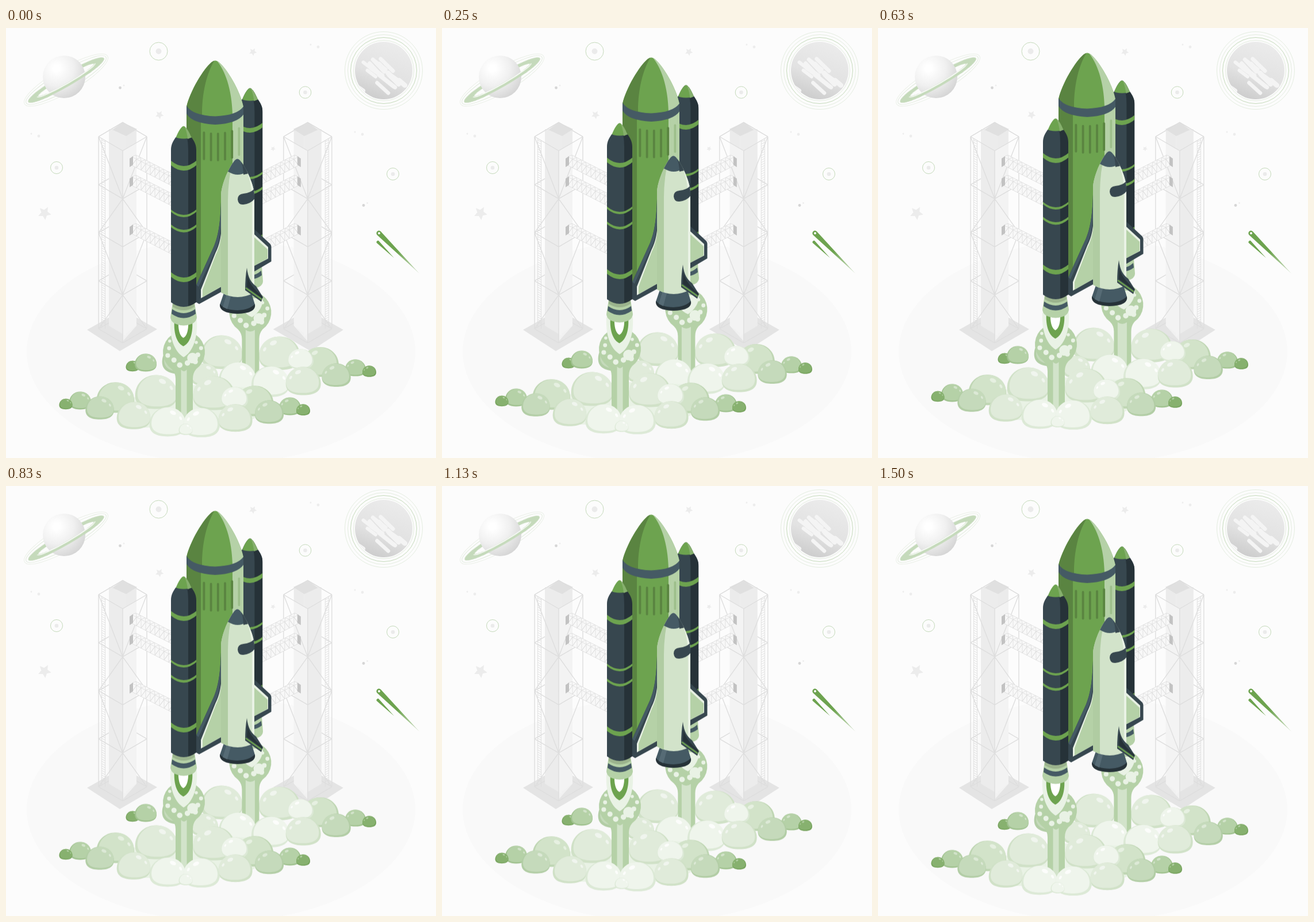
An HTML page that plays this animation: 748 by 748 pixels, repeating every 1540 ms.

```html
<!DOCTYPE html>
<html lang="en">
<head>
<meta charset="utf-8">
<title>Rocket launch</title>
<style>
html, body { margin: 0; width: 100%; height: 100%; overflow: hidden; background: #fcfcfc; }
svg { display: block; width: 748px; height: 748px; }
#ship { animation: hover 1540ms infinite; }
@keyframes hover {
  0% { transform: translateY(.1px); animation-timing-function: steps(17); }
  45.946% { transform: translateY(-15px); animation-timing-function: steps(19); }
  97.297% { transform: translateY(.7px); animation-timing-function: steps(1); }
  100% { transform: translateY(.1px); }
}
.ring { transform-origin: 104.5px 90.5px; animation: sway 1540ms linear infinite; }
@keyframes sway { 0%, 45%, 100% { transform: none; } 73% { transform: scale(.985); } }
.line { fill: none; stroke: #dedede; stroke-width: 1.4; stroke-linejoin: round; }
.thin { fill: none; stroke: #dcdcdc; stroke-width: .8; }
.green { fill: #6da34f; } .leaf { fill: #5a8441; } .pale { fill: #b5d1a7; }
.mist { fill: #d2e3ca; } .foam { fill: #e9f2e5; }
.slate { fill: #455a64; } .steel { fill: #37474f; } .night { fill: #263238; }
</style>
</head>
<body>
<svg viewBox="0 0 748 748">
  <defs>
    <radialGradient id="ball" cx=".32" cy=".3" r=".75">
      <stop offset=".1" stop-color="#fff"/><stop offset=".55" stop-color="#f0f0f0"/><stop offset="1" stop-color="#d6d6d6"/>
    </radialGradient>
    <linearGradient id="moon" x1=".75" y1="0" x2=".4" y2="1">
      <stop offset="0" stop-color="#ececec"/><stop offset=".6" stop-color="#e2e2e2"/><stop offset="1" stop-color="#cdcdcd"/>
    </linearGradient>
    <linearGradient id="tail" gradientUnits="userSpaceOnUse" x1="650" y1="358" x2="719" y2="427">
      <stop offset=".45" stop-color="#6da34f"/><stop offset="1" stop-color="#6da34f" stop-opacity=".25"/>
    </linearGradient>
    <clipPath id="disc"><circle cx="657" cy="74" r="50"/></clipPath>
    <clipPath id="front"><path d="M-90 0H90V40H-90Z"/></clipPath>
    <clipPath id="tankClip"><path d="M314 137C320 110 344 70 358 59Q364 54 370 59C384 70 408 110 413 137V455H314Z"/></clipPath>
    <clipPath id="orbiterClip"><path d="M374 291C374 276 385 246 398 230Q402.500 225 407 230C420 246 432 276 432 291V460Q403 476 374 460Z"/></clipPath>
    <clipPath id="boosterClip"><path d="M287 212C287 202 291 196 296 189Q301 177 306 172Q309 169 312 172Q317 177 322 189C327 196 331 202 331 212V477Q309 493 287 477Z"/></clipPath>
  </defs>

  <ellipse cx="374" cy="563" rx="338" ry="195" fill="#f9f9f9"/>
  <g id="sky"></g>

  <g fill="none" transform="translate(104.5 90.500) rotate(-30)">
    <ellipse rx="83.300" ry="21" stroke="#ebf0e8"/><ellipse rx="80" ry="16.500" stroke="#e2ebde"/>
  </g>
  <g class="ring"><g transform="translate(104.5 90.500) rotate(-30)">
    <path id="band" d="M-76 0A76 11.500 0 0 1 76 0A76 11.500 0 0 1-76 0ZM-56 0A56 5.500 0 0 0 56 0A56 5.500 0 0 0-56 0Z" fill="#c5dabb"/>
  </g></g>
  <circle cx="101" cy="85" r="37" fill="url(#ball)"/>
  <g class="ring"><g transform="translate(104.5 90.500) rotate(-30)" clip-path="url(#front)">
    <use href="#band"/>
    <ellipse rx="58" ry="6.500" fill="none" stroke="#fff" stroke-width="1.500"/>
  </g></g>

  <circle cx="657" cy="74" r="50" fill="url(#moon)"/>
  <g id="streaks" clip-path="url(#disc)" stroke="#f4f4f4" stroke-linecap="round"></g>

  <path fill="url(#tail)" d="M645.500 360A4.300 4.300 0 0 1 652 354L719 427Z"/>
  <circle cx="649" cy="357" r="2" fill="#fcfcfc"/>
  <path class="green" d="M645 374A2.300 2.300 0 0 1 649 371L675 400Z"/>

  <g id="tower"></g>
  <use href="#tower" transform="matrix(-1 0 0 1 727.800 0)"/>

  <g id="ship">
    <g id="back"></g>
    <g id="jetBack" transform="translate(115.400 -69)"></g>
    <g id="mid"></g>
    <path class="foam" d="M402 470H447Q447 490 428 503Q410 496 402 470Z"/>
    <path class="pale" d="M408 415H445L447 440Q447 452 425 454Q404 452 404 440Z"/>
    <path class="slate" d="M408 423Q426 438 444 422L445 430Q426 444 407 430Z"/>
    <use href="#booster" transform="translate(115.400 -66)"/>

    <g clip-path="url(#tankClip)">
      <path class="green" d="M310 50H420V480H310Z"/>
      <path class="leaf" d="M364 54C350 76 341 110 341 150L339 165V480H310V50Z"/>
      <path class="pale" d="M364 54C380 70 393 105 394 150V480H420V50Z"/>
      <path class="slate" d="M314 135Q324 152 364 153.500Q404 152 414 135V149Q404 166 364 168Q324 166 314 149Z"/>
      <g id="slots" fill="none" stroke-width="3.800" stroke-linecap="round"></g>
    </g>

    <path class="steel" d="M374 303C373 340 369 362 362 379L331 447V477L336 480L378 457V303Z"/>
    <path class="slate" d="M374 303C373 340 369 362 362 379L331 447L335 450L367 381Q373 365 375 330Z"/>
    <path class="foam" d="M375 344C374 368 370 380 364 392L339 455V470L376 449Z"/>
    <path class="pale" d="M375 350C374 372 370 384 365 394L342 455V468L376 449Z"/>
    <path class="steel" d="M431 349L458 374Q461.500 377 461.500 381V406L431 424Z"/>
    <path class="foam" d="M431 358L456 381V401L431 414Z"/>
    <path class="pale" d="M431 363L455 385V401L431 414Z"/>

    <path class="slate" d="M380 458H426L433 481Q430 496 403 496.500Q375 496 372 481Z"/>
    <path class="night" d="M372 480Q382 491 403 491Q424 490 433 480Q436 496 403 497Q370 496 372 480Z"/>
    <path d="M384 462L391 467L385 489L377 485Z" fill="#566b75"/>
    <g clip-path="url(#orbiterClip)">
      <path class="mist" d="M370 224H436V480H370Z"/>
      <path d="M396 224Q386 262 386 300V480H370V224Z" fill="#b0cca2"/>
      <path class="foam" d="M411 230Q428 264 428 300V480H436V230Z"/>
      <path class="slate" d="M370 222H436V250H419Q403 260 387 250H370Z"/>
      <path class="steel" d="M405 222Q413 238 413 255L436 250V222Z"/>
      <path class="steel" d="M433 278Q427 287 413 288Q403 289 403 298Q404 308 413 307Q427 305 433 296Z"/>
    </g>
    <path class="steel" d="M419 417C421 435 427 443 435 449L447 468L444 476L416 456Q416 434 419 417Z"/>
    <path class="night" d="M420 430Q423 448 446 467V470L419 450Z"/>
    <path d="M417 452L445 472" fill="none" stroke="#6da34f" stroke-width="2.200"/>

    <g id="fore"></g>
    <g id="jet"></g>
    <path class="foam" d="M286 508C284 545 296 565 309 572.500C322 565 334 545 332 508Z"/>
    <path class="green" d="M293 508C291 535 299 549 308.500 553.500C318 549 326 535 324 508Z"/>
    <path fill="#fff" d="M300 508C299 527 303 536 308.500 539C314 536 318 527 317 508Z"/>
    <path class="pale" d="M290 478H328L332 503Q331 516 309 517.500Q287 516 286 503Z"/>
    <path fill="#9bb38d" d="M290 479H328V485Q309 497 290 485Z"/>
    <path class="slate" d="M289 489Q309 503 329 489L330 497Q309 512 288 497Z"/>
    <g id="booster" clip-path="url(#boosterClip)">
      <path class="steel" d="M285 168H333V490H285Z"/>
      <path class="night" d="M309 168Q317 188 317 212V490H333V168Z"/>
      <path class="green" d="M290 168H328V188Q309 197 290 188Z"/>
      <path d="M309 168Q315 180 316 193L328 188V168Z" fill="#86b06d"/>
      <g id="bands" class="green"></g>
    </g>
    <g id="near"></g>
  </g>
</svg>
<script>
const put = (id, html) => { document.getElementById(id).innerHTML = html; };
const times = (n, fn) => Array.from({ length: n }, (_, i) => fn(i));
const draw = (n, fn) => times(n, fn).join('');
const mix = (a, b, u) => a + (b - a) * u;
const dot = (x, y, r, attrs) => `<circle cx="${x}" cy="${y}" r="${r}" ${attrs}/>`;
let seed = 7;
const rand = (lo, hi) => mix(lo, hi, (seed = seed * 16807 % 2147483647) / 2147483647);

// Sky
const star = (x, y, r) => {
  const pts = times(10, i => {
    const a = i * Math.PI / 5 + .2, d = i % 2 ? r * .48 : r;
    return `${x + d * Math.cos(a)},${y + d * Math.sin(a)}`;
  });
  return `<polygon points="${pts.join(' ')}" fill="#ececec"/>`;
};
const orb = (x, y, r) => dot(x, y, r, 'fill="none" stroke="#c5dabb"') + dot(x, y, r * .32, 'fill="#ebebeb"');
const specks = (x, y, side, tone) => dot(x, y, 2.4, `fill="${tone}"`) + dot(x + side * 6.5, y - 4, 1.4, 'fill="#ededed"');
put('sky',
  orb(265.5, 40.5, 15.5) + orb(520.5, 112, 10.3) + orb(88, 243, 10.5) + orb(673, 254, 10.5) +
  specks(198.5, 104, 1, '#d6d6d6') + specks(622, 308.5, 1, '#d6d6d6') +
  specks(543, 33, -2, '#ededed') + specks(57, 188, -2, '#ededed') + specks(620, 185, -2, '#ededed') +
  star(429.5, 41.5, 7) + star(267, 151, 7.5) + star(67, 322, 12) + star(464.5, 210, 4.5) +
  draw(4, i => dot(657, 74, 52.5 + i * 5, `fill="none" stroke="${i === 1 ? '#c5dabb' : '#e4ede0'}"`)));
put('streaks', draw(16, () => {
  const x = rand(608, 690), y = rand(28, 106), len = rand(8, 26);
  return `<path d="M${x} ${y}l${len} ${len * rand(.6, 1.1)}" stroke-width="${rand(4, 9)}"/>`;
}));

// Launch tower with three arms
const step = 83.6, rise = 24.5;
const sides = fn => fn(161) + fn(245);
const beams = dir => draw(5, k => sides(x => `M${x} ${189 + k * step}L203 ${189 + k * step + dir * rise}`));
const braces = draw(4, k => {
  const y = 189 + k * step;
  return sides(x => k % 2 ? `M203 ${y + rise}L${x} ${y + step}` : `M${x} ${y}L203 ${y + step + rise}`);
});
const posts = 'M161 189V523M245 189V523M203 213V548M161 189L203 164L245 189';
const ladder = 'M166.500 192V520M172.500 195V523' + draw(80, i => `M166.500 ${195 + i * 4}l6 3`);
const arm = y => {
  const rails = `M219 ${y - 9}l84 43M219 ${y + 6}l84 43M226 ${y - 12}l84 43`;
  const web = draw(10, i => {
    const start = `M${219 + i * 8} ${y - 9 + i * 4.1}`;
    return `${start}v15l8-11${start}l7-3l1 7l-8 11`;
  });
  return `<path d="M219 ${y - 9}l7-3l84 43v18h-7l-84-43z" fill="#f8f8f8"/><path class="thin" d="${rails + web}"/>
    <path d="M215 ${y - 6}l6-4v15l-6 4z" fill="#c2c2c2"/>`;
};
put('tower', `<path d="M141 525L203 490L263 524L198 562Z" fill="#e4e4e4"/>
  <path class="line" d="${beams(-1)}"/>
  <path d="M179 176H209V536L179 518Z" fill="#ececec"/><path d="M209 176H227V518L209 531Z" fill="#ebebeb"/>
  <path d="M203 213L227 200V518L203 545Z" fill="#f6f6f6" opacity=".75"/>
  <path d="M185 177L203 164L228 176L209 188Z" fill="#e0e0e0"/>
  <path class="thin" d="${ladder}"/><path class="line" d="${posts + beams(1) + braces}"/>` + arm(233) + arm(268) + arm(352));

// Smoke: [body, rim, shine] per tone
const tones = {
  dark: ['#87b16f', '#72a058', '#b5d1a7'], leafy: ['#b5d1a7', '#9fc18e', '#d2e3ca'],
  soft: ['#c5dabb', '#b2cda5', '#dce9d6'], light: ['#d2e3c9', '#bfd6b3', '#e6f0e1'],
  hazy: ['#e0ebda', '#d0e1c7', '#f0f5ee'], white: ['#eff5ec', '#dce9d6', '#fcfdfb']
};
const puff = (x, y, w, h) => `M${x - w} ${y + h * .2}C${x - w} ${y - h * .5} ${x - w * .55} ${y - h} ${x} ${y - h}
  S${x + w} ${y - h * .5} ${x + w} ${y + h * .2}C${x + w} ${y + h * .78} ${x + w * .6} ${y + h} ${x} ${y + h}
  S${x - w} ${y + h * .78} ${x - w} ${y + h * .2}Z`;
const cloud = (x, y, w, tone, side = 1) => {
  const h = w * .81, [body, rim, shine] = tones[tone];
  const spot = (dx, dy, r, a) => {
    const cx = x + side * dx * w, cy = y - dy * h;
    return `<ellipse cx="${cx}" cy="${cy}" rx="${r * w}" ry="${r * w * .6}" fill="${shine}" transform="rotate(${side * a} ${cx} ${cy})"/>`;
  };
  return `<path d="${puff(x, y, w, h)}" fill="${rim}"/>
    <path d="${puff(x + side * w * .05, y - h * .07, w * .94, h * .92)}" fill="${body}"/>` +
    spot(.3, .62, .18, 25) + spot(.72, .24, .11, 60);
};
// A row of puffs from one [x, y, radius] to another, arched and swollen in the middle
const bank = (from, to, { arch, swell, spread, row }) => row.map((tone, i) => {
  const u = i / (row.length - 1), v = 2 * u - 1, bulge = Math.max(0, Math.sin(Math.PI * u));
  const [x, y, r] = from.map((a, k) => mix(a, to[k], k ? u : .5 + Math.sign(v) * Math.abs(v) ** spread / 2));
  return cloud(x, y + arch * bulge ** 2, r + swell * Math.sqrt(bulge), tone, u < .5 ? 1 : -1);
});
const backRow = bank([243, 582, 19], [608, 591, 18],
  { arch: -24, swell: 18, spread: .8, row: ['leafy', 'soft', 'hazy', 'hazy', 'light', 'leafy'] });
const midRow = bank([345, 603, 24], [632, 597, 12],
  { arch: 16, swell: 14, spread: 1, row: ['hazy', 'white', 'white', 'hazy', 'soft', 'dark'] });
const foreRow = bank([129, 648, 19], [494, 658, 19],
  { arch: -21, swell: 18, spread: .8, row: ['leafy', 'light', 'hazy', 'hazy', 'light', 'leafy'] });
const nearRow = bank([104, 654, 11.5], [517, 664, 12],
  { arch: 28, swell: 20, spread: 1, row: ['dark', 'soft', 'hazy', 'white', 'white', 'hazy', 'soft', 'dark'] });
const middle = nearRow.splice(3, 2);
put('back', cloud(220, 588, 11.5, 'dark') + backRow.join('') + cloud(513, 576, 22, 'white', -1));
put('mid', midRow.join(''));
put('fore', '<path class="foam" d="M215 645L300 620L420 625L470 660L400 695H240Z"/>' +
  foreRow.join('') + cloud(398, 643, 23, 'white', -1) + nearRow.join(''));
put('near', middle.join('') + cloud(312.5, 698, 12, 'white'));

// Exhaust jets
const bubbles = draw(10, i => {
  const a = mix(-.6, 3.75, i / 9), d = 26 + (i % 2) * 4;
  return dot(309.5 + d * Math.cos(a), 560 + d * Math.sin(a) * .9, 2.8 + 2 * Math.sin(i * .35), 'class="foam"');
}) + dot(324.5, 574, 9.3, 'class="foam"');
const jet = stripe => `<path class="pale" d="M295 692V610Q295 600 288 593A36.500 36.500 0 1 1 331 593Q325 600 325 610V692Z"/>
  <path class="mist" d="M${309.5 - stripe} 692V594Q309.500 600 ${309.5 + stripe} 594V692Z"/>` + bubbles;
put('jet', jet(5));
put('jetBack', jet(8));

// Hull details
const band = (y, h) => `<path d="M286 ${y}Q309 ${y + 20} 332 ${y}v${h}Q309 ${y + h + 20} 286 ${y + h}Z"/>`;
put('bands', band(230, 8) + band(315, 4) + band(341, 4.5) + band(424, 8));
put('slots', draw(8, i => {
  const x = 320 + i * 12.2, y = 184 - ((x - 364) / 50) ** 2 * 14;
  return `<path d="M${x} ${y}v46" stroke="${x > 394 ? '#9dbf8b' : '#5a8441'}"/>`;
}));
</script>
</body>
</html>
```
